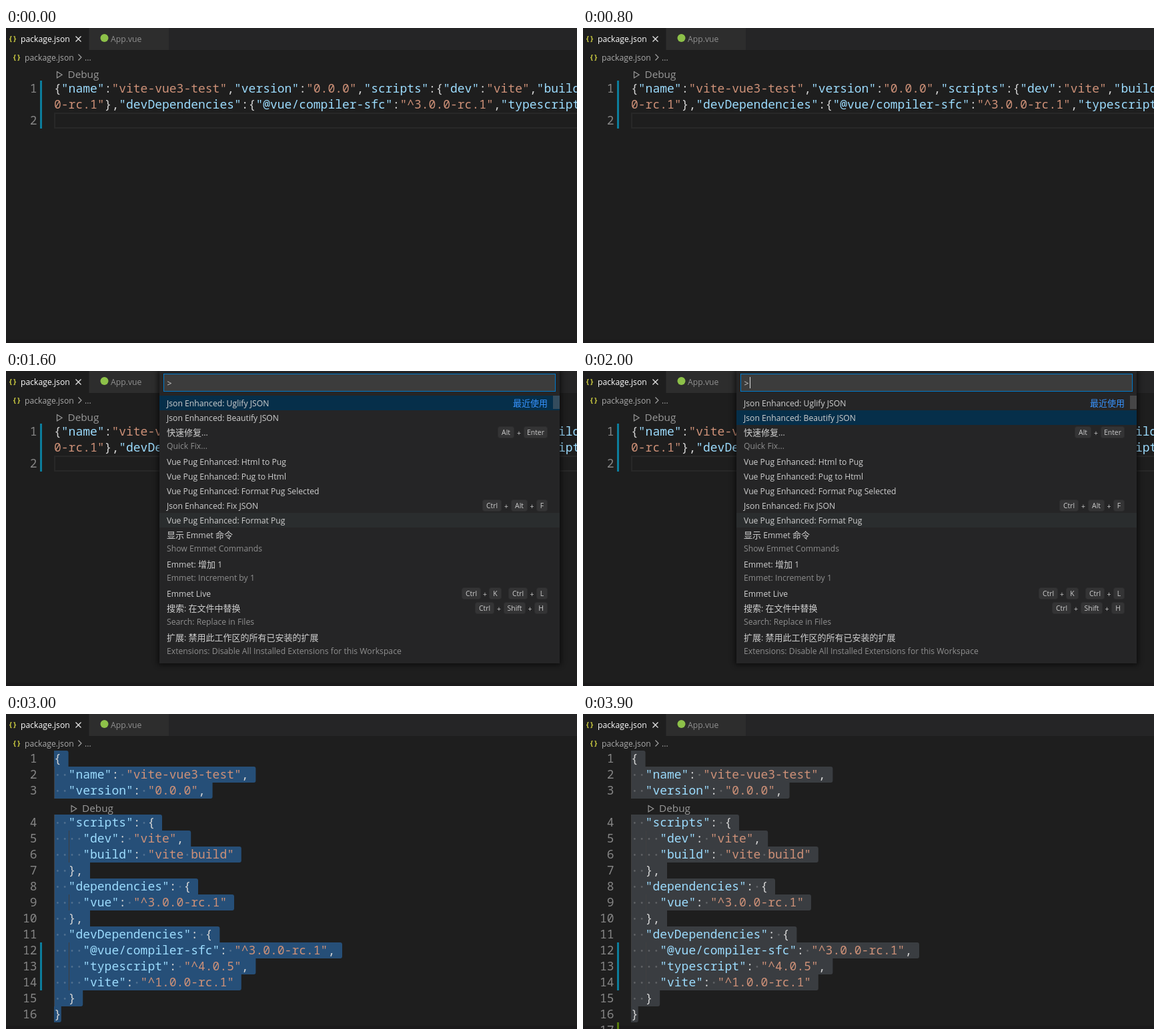
An HTML page that plays this animation: 856 px wide and 473 px high, repeating every 4000 ms.

```html
<!DOCTYPE html>
<html lang="en">
<head>
<meta charset="utf-8">
<title>JSON formatting</title>
<style>
  html, body { margin: 0; width: 100%; height: 100%; overflow: hidden; background: #1e1e1e; }
  svg { display: block; width: 856px; height: 473px; }
  text { white-space: pre; font: 12.2px "Open Sans", "Noto Sans CJK SC", "Noto Sans CJK", sans-serif; }
  .code { font: 500 18px "Noto Sans Mono", "DejaVu Sans Mono", monospace; font-variant-ligatures: none; }
  .lens { font-size: 15.3px; }
  .key { font-size: 10.4px; }
  .icon { font: 700 11px "Noto Sans Mono", monospace; }
  .shadow { filter: blur(4px); }
</style>
</head>
<body>
<svg id="stage" viewBox="0 0 856 473"></svg>
<script>
const LOOP = 4000, LEFT = 72, TOP = 55, ROW = 24, CHAR = 10.8;
const stage = document.getElementById('stage');
const layers = [];

function add(parent, tag, attrs = {}, content = '') {
  const el = document.createElementNS('http://www.w3.org/2000/svg', tag);
  for (const name in attrs) el.setAttribute(name, attrs[name]);
  el.textContent = content;
  return parent.appendChild(el);
}
const rect = (g, x, y, width, height, fill, more) =>
  add(g, 'rect', { x, y, width, height, fill, ...more });
const label = (g, x, y, fill, content, more) =>
  add(g, 'text', { x, y, fill, ...more }, content);
const path = (g, d, stroke, width = 1) =>
  add(g, 'path', { d, stroke, 'stroke-width': width, fill: 'none' });

// A group that is visible only during the given [from, to) spans.
function layer(parent, ...spans) {
  const el = add(parent, 'g');
  layers.push({ el, spans });
  return el;
}

const pkg = {
  name: 'vite-vue3-test',
  version: '0.0.0',
  scripts: { dev: 'vite', build: 'vite build' },
  dependencies: { vue: '^3.0.0-rc.1' },
  devDependencies: { '@vue/compiler-sfc': '^3.0.0-rc.1', typescript: '^4.0.5', vite: '^1.0.0-rc.1' }
};

// Draws highlighted JSON on one row, starting at character "from".
function jsonRow(g, source, y, from = 0) {
  for (const m of source.matchAll(/"[^"]*"|[^"\s]+/g)) {
    const end = m.index + m[0].length;
    const start = Math.max(m.index, from);
    const x = LEFT + (start - from) * CHAR;
    if (end <= from || x > 856) continue;
    const color = m[0][0] !== '"' ? '#d4d4d4' : source[end] === ':' ? '#9cdcfe' : '#ce9178';
    label(g, x, y + 18, color, source.slice(start, end), { class: 'code' });
  }
}
const lineNumber = (g, n, y) =>
  label(g, 46.5, y + 18, '#858585', n, { class: 'code', 'text-anchor': 'end' });
const changeBar = (g, y, height, fill = '#0c7d9d') => rect(g, 51, y, 3, height, fill);
const caret = (g, x, y) => rect(g, x, y, 2, ROW, '#aeafad');

function codeLens(g, x, y) {
  path(g, `M${x + 4.5} ${y + 10.5}v9.4l7.6-4.7z`, '#999', 1.2);
  label(g, x + 20.5, y + 20, '#999', 'Debug', { class: 'lens' });
}

function chrome(g) {
  rect(g, 0, 0, 856, 33, '#252526');
  rect(g, 0, 0, 124, 33, '#1e1e1e');
  rect(g, 125, 0, 119, 33, '#2d2d2d');
  label(g, 3.5, 19.5, '#cbcb41', '{}', { class: 'icon' });
  label(g, 22, 21, '#fff', 'package.json');
  path(g, 'M104.5 12.5l8 8m0-8l-8 8', '#e8e8e8', 1.2);
  add(g, 'circle', { cx: 147.5, cy: 15, r: 6, fill: '#8dc149' });
  label(g, 157, 21, '#8f8f8f', 'App.vue');
  label(g, 9.5, 47.5, '#cbcb41', '{}', { class: 'icon' });
  label(g, 28, 49, '#a9a9a9', 'package.json');
  path(g, 'M108.5 39.5l4.5 4.5l-4.5 4.5', '#a9a9a9', 1.1);
  label(g, 118, 49, '#a9a9a9', '...');
  rect(g, 0, 468, 856, 5, '#1b1a1b');
}

function compact(g) {
  const source = JSON.stringify(pkg);
  rect(g, LEFT + 1, 128, 790, 22, 'none', { stroke: '#282828', 'stroke-width': 2 });
  codeLens(g, LEFT, TOP);
  jsonRow(g, source, 79);
  jsonRow(g, source, 103, source.indexOf('0-rc.1"}'));
  lineNumber(g, 1, 79);
  lineNumber(g, 2, 127);
  changeBar(g, 79, 72);
}

function formatted(g, lensAfter, selection, firstChanged, lastChanged) {
  const lines = JSON.stringify(pkg, null, 2).split('\n');
  const last = lines.length - 1;
  const cells = i => i < 0 || i > last ? 0 : lines[i].length + (i < last ? 1 : 0);
  lines.forEach((line, i) => {
    const y = TOP + ROW * (i + (i >= lensAfter ? 1 : 0));
    const right = LEFT + cells(i) * CHAR;
    const r1 = cells(i) > cells(i - 1) || i === lensAfter ? 3 : 0;
    const r2 = cells(i) > cells(i + 1) || i === lensAfter - 1 ? 3 : 0;
    add(g, 'path', {
      fill: selection,
      d: `M${LEFT} ${y}H${right - r1}q${r1} 0 ${r1} ${r1}V${y + ROW - r2}q0 ${r2} ${-r2} ${r2}H${LEFT}z`
    });
    const indent = line.search(/\S/);
    for (let c = 0; c < indent; c += 2) rect(g, Math.round(LEFT + c * CHAR), y, 1, ROW, '#404040');
    jsonRow(g, line, y);
    for (const m of line.matchAll(/ /g)) {
      add(g, 'circle', {
        cx: LEFT + (m.index + .5) * CHAR, cy: y + 12.5, r: 1.4, fill: '#e3e4e2', 'fill-opacity': .22
      });
    }
    lineNumber(g, i + 1, y);
    if (i + 1 >= firstChanged && i + 1 <= lastChanged) changeBar(g, y, ROW);
  });
  codeLens(g, LEFT + 2 * CHAR, TOP + ROW * lensAfter);
}

// Chinese runs are set a little larger than the Latin text beside them.
function mixedLabel(g, x, y, fill, content) {
  const el = label(g, x, y, fill, '');
  for (const run of content.match(/[\u4e00-\u9fff]+|[^\u4e00-\u9fff]+/g)) {
    add(el, 'tspan', { 'font-size': run[0] > '\u4dff' ? 13 : 12.2 }, run);
  }
}

// Each chord is a list of [text, x, width].
function shortcut(g, chords, y) {
  for (const chord of chords) {
    chord.forEach(([name, x, width], i) => {
      rect(g, x + .5, y + 2.5, width - 1, 17, '#343435', { rx: 3, stroke: '#2d2d2e' });
      label(g, x + width / 2, y + 15, '#ccc', name, { class: 'key', 'text-anchor': 'middle' });
      if (!i) return;
      const [, px, pw] = chord[i - 1];
      label(g, (px + pw + x) / 2, y + 15.5, '#ccc', '+', { class: 'key', 'text-anchor': 'middle' });
    });
  }
}

const commands = [
  { text: 'Json Enhanced: Uglify JSON' },
  { text: 'Json Enhanced: Beautify JSON' },
  { text: '快速修复...', detail: 'Quick Fix...', keys: [[['Alt', 737, 25], ['Enter', 776, 36]]] },
  { text: 'Vue Pug Enhanced: Html to Pug' },
  { text: 'Vue Pug Enhanced: Pug to Html' },
  { text: 'Vue Pug Enhanced: Format Pug Selected' },
  { text: 'Json Enhanced: Fix JSON', keys: [[['Ctrl', 714, 29], ['Alt', 757, 25], ['F', 795, 17]]] },
  { text: 'Vue Pug Enhanced: Format Pug', hover: true },
  { text: '显示 Emmet 命令', detail: 'Show Emmet Commands' },
  { text: 'Emmet: 增加 1', detail: 'Emmet: Increment by 1' },
  { text: 'Emmet Live', keys: [[['Ctrl', 683, 29], ['K', 724, 19]], [['Ctrl', 753, 29], ['L', 795, 17]]] },
  { text: '搜索: 在文件中替换', detail: 'Search: Replace in Files',
    keys: [[['Ctrl', 703, 29], ['Shift', 746, 33], ['H', 792, 20]]] },
  { text: '扩展: 禁用此工作区的所有已安装的扩展',
    detail: 'Extensions: Disable All Installed Extensions for this Workspace' }
];

function palette(g) {
  rect(g, 228, -2, 604, 443, '#000', { class: 'shadow', opacity: .65 });
  rect(g, 230, 0, 600, 439, '#252526');
  rect(g, 236.5, 4.5, 587, 26, '#3c3c3c', { stroke: '#007acc' });
  label(g, 241.5, 22.5, '#ccc', '>');
  rect(layer(g, [1100, 1600], [2000, 2500]), 250, 9, 1, 17, '#e0e0e0');
  rect(layer(g, [1100, 1900]), 230, 37, 600, 22, '#062f4a');
  rect(layer(g, [1900, 2500]), 230, 59, 600, 22, '#062f4a');
  let y = 37;
  for (const { text, detail, keys, hover } of commands) {
    if (hover) rect(g, 230, y, 600, 22, '#2a2d2e');
    mixedLabel(g, 241, y + 16, '#d0d0d0', text);
    if (detail) label(g, 241, y + 36, '#8f8f8f', detail);
    if (keys) shortcut(g, keys, y);
    y += detail ? 44 : 22;
  }
  label(g, 760, 53, '#3794ff', '最近使用', { style: 'font-size:13px' });
  rect(g, 820, 37, 10, 20, '#797979', { 'fill-opacity': .4 });
}

chrome(stage);
compact(layer(stage, [0, 2500]));
caret(layer(stage, [300, 800]), LEFT, 127);
palette(layer(stage, [1100, 2500]));
formatted(layer(stage, [2500, 2700]), 2, '#264f78', 1, 16);
formatted(layer(stage, [2700, 3900]), 3, '#264f78', 12, 14);
formatted(layer(stage, [3900, LOOP]), 3, '#3a3d41', 12, 14);
caret(layer(stage, [2500, 3000], [3400, 3900]), 82, 439);
lineNumber(layer(stage, [3400, LOOP]), 17, 463);
changeBar(layer(stage, [3600, LOOP]), 463, 10, '#587c0c');

const start = performance.now();
function draw() {
  const t = (performance.now() - start) % LOOP;
  for (const { el, spans } of layers) {
    el.style.display = spans.some(([from, to]) => t >= from && t < to) ? '' : 'none';
  }
  requestAnimationFrame(draw);
}
draw();
</script>
</body>
</html>
```
